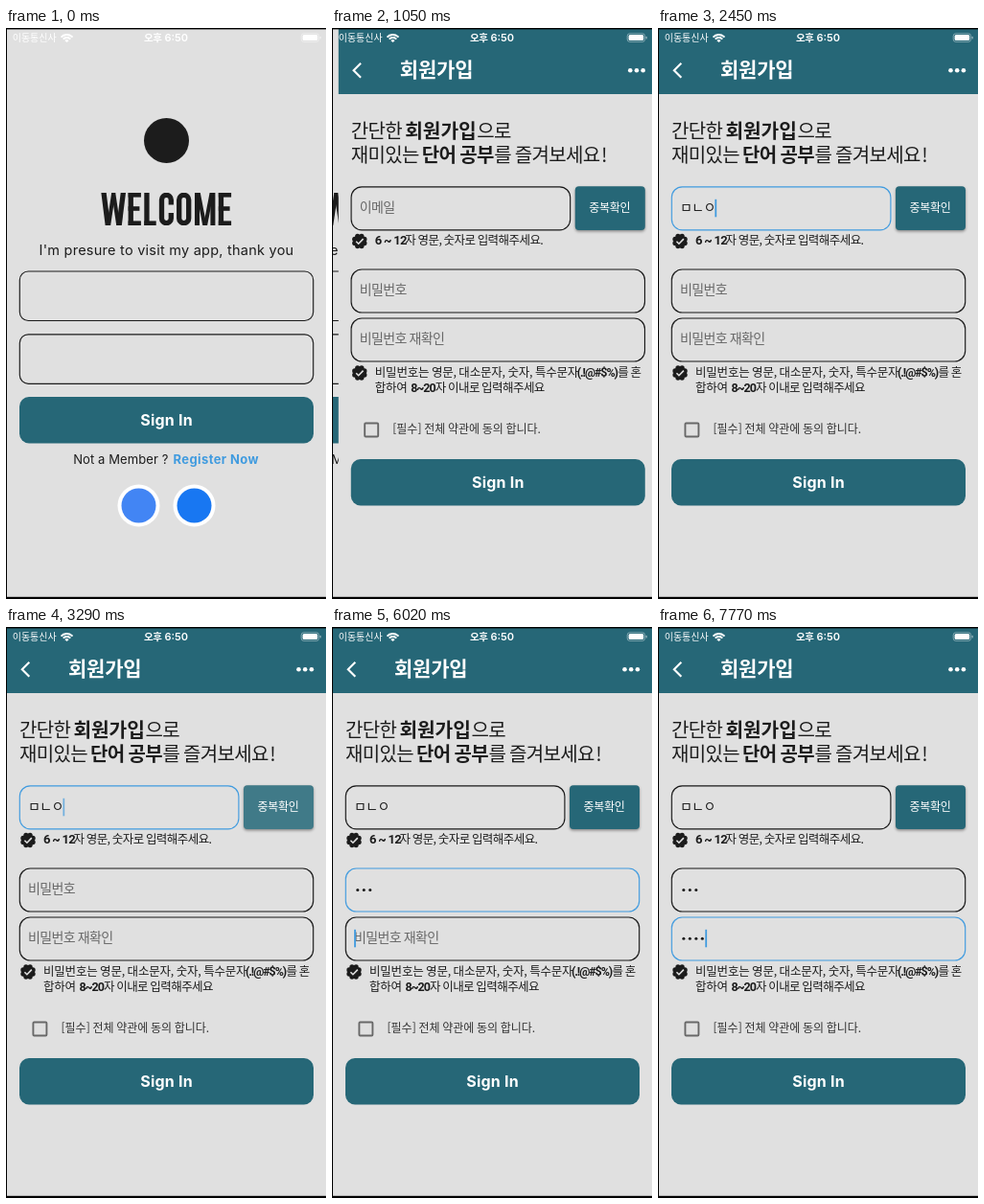
An HTML page with a canvas for the animation above (8000 ms loop, 334x596 px).

```html
<!DOCTYPE html>
<html lang="ko">
<head>
<meta charset="utf-8">
<title>Sign up</title>
<style>
html, body { margin: 0; width: 100%; height: 100%; overflow: hidden; background: #000; }
canvas { display: block; }
</style>
</head>
<body>
<canvas id="stage" width="334" height="596" role="img" aria-label="WELCOME, sign-in and sign-up screens"></canvas>
<script>
const ctx = document.getElementById('stage').getContext('2d');
const WIDTH = 334, HEIGHT = 596, LOOP = 8000, STEP = 70;
const KR = '"Noto Sans CJK KR", "Noto Sans CJK JP", "Noto Sans CJK", sans-serif';
const LATIN = 'Inter, "Open Sans", sans-serif';
const DIGITS = 'Roboto, "Liberation Sans", sans-serif';
const PAPER = '#e0e0e0', TEAL = '#266777', INK = '#1c1c1c', HINT = '#686868', BLUE = '#409bdf';

// ---- timing ----
const clamp = v => Math.max(0, Math.min(1, v));
const ramp = (t, from, to) => clamp((t - from) / (to - from));
const countPast = (t, times) => times.filter(at => t >= at).length;

function bezier(x, x1, y1, x2, y2) {
  const at = (s, a, b) => 3 * (1 - s) ** 2 * s * a + 3 * (1 - s) * s * s * b + s ** 3;
  let lo = 0, hi = 1;
  for (let i = 0; i < 24; i++) {
    const mid = (lo + hi) / 2;
    if (at(mid, x1, x2) < x) lo = mid; else hi = mid;
  }
  return at(lo, y1, y2);
}

// Fast start, then a long settle; the two curves meet at (mx, my).
function pageEase(x) {
  const mx = 0.198, my = 0.541;
  if (x <= 0 || x >= 1) return clamp(x);
  if (x < mx) return my * bezier(x / mx, 0.056 / mx, 0.024 / my, 0.108 / mx, 0.3085 / my);
  const sx = 1 - mx, sy = 1 - my;
  return my + sy * bezier((x - mx) / sx, (0.3655 - mx) / sx, 1, (0.5465 - mx) / sx, (0.989 - my) / sy);
}
const parallaxEase = x => x <= 0 || x >= 1 ? clamp(x) : bezier(x, 0.35, 0.91, 0.33, 0.97);

// ---- drawing helpers ----
function text(str, x, y, size, { color = INK, weight = 400, family = KR, spacing = 0, align = 'left' } = {}) {
  ctx.font = `${weight} ${size}px ${family}`;
  ctx.letterSpacing = spacing + 'px';
  ctx.textAlign = align;
  ctx.fillStyle = color;
  ctx.fillText(str, x, y);
}

function box(x, y, w, h, r, fill, stroke, line = 1.15) {
  ctx.beginPath();
  ctx.roundRect(x, y, w, h, r);
  if (fill) { ctx.fillStyle = fill; ctx.fill(); }
  if (stroke) { ctx.strokeStyle = stroke; ctx.lineWidth = line; ctx.stroke(); }
}

function disc(x, y, r, color) {
  ctx.fillStyle = color;
  ctx.beginPath();
  ctx.arc(x, y, r, 0, Math.PI * 2);
  ctx.fill();
}

function line(color, width, ...points) {
  ctx.strokeStyle = color;
  ctx.lineWidth = width;
  ctx.beginPath();
  points.forEach(([x, y]) => ctx.lineTo(x, y));
  ctx.stroke();
}

function at(x, draw) {
  ctx.save();
  ctx.translate(x, 0);
  draw();
  ctx.restore();
}

function signInButton(y) {
  box(14, y, 307, 48.5, 10, TEAL);
  text('Sign In', 167.6, y + 30, 16, { color: '#fff', weight: 700, family: LATIN, spacing: 0.25, align: 'center' });
}

// ---- welcome page ----
const STEM = 5.3, BAR = 4.6;

function letterE(x) {
  ctx.fillRect(x, 172, STEM, 34);
  ctx.fillRect(x, 172, 13.3, BAR);
  ctx.fillRect(x, 186.2, 11.8, BAR);
  ctx.fillRect(x, 206 - BAR, 13.3, BAR);
}

// Tall condensed display lettering
function headline() {
  ctx.save();
  ctx.beginPath();
  ctx.rect(90, 172, 155, 34);
  ctx.clip();
  ctx.fillStyle = INK;
  line(INK, STEM, [101.8, 170], [106.4, 207]);
  line(INK, 4, [107, 207], [112.2, 172]);
  line(INK, 4, [112.2, 172], [117.4, 207]);
  line(INK, STEM, [118, 207], [122.6, 170]);
  letterE(127.6);
  ctx.fillRect(144.3, 172, STEM, 34);
  ctx.fillRect(144.3, 206 - BAR, 12.4, BAR);

  const top = 174.4, bottom = 203.6, left = 162.5, right = 172.3;
  ctx.strokeStyle = INK;
  ctx.lineWidth = STEM;
  ctx.beginPath();
  ctx.moveTo(right, 184.5);
  ctx.arcTo(right, top, 167, top, 4.8);
  ctx.arcTo(left, top, left, 184, 4.8);
  ctx.arcTo(left, bottom, 167, bottom, 4.8);
  ctx.arcTo(right, bottom, right, 194, 4.8);
  ctx.lineTo(right, 193);
  ctx.stroke();
  box(180.7, top, 10, bottom - top, 4.8, null, INK, STEM);

  ctx.fillRect(197, 172, 5, 34);
  ctx.fillRect(213.4, 172, 5, 34);
  line(INK, 4, [200, 168], [207.7, 208]);
  line(INK, 4, [215.4, 168], [207.7, 208]);
  letterE(221.8);
  ctx.restore();
}

function welcomePage() {
  disc(167.5, 117.5, 23.5, INK);
  headline();
  text("I'm presure to visit my app, thank you", 167.5, 237, 14.5,
    { family: LATIN, spacing: 0.24, align: 'center' });
  box(14.3, 254, 306.4, 51.5, 9, null, INK);
  box(14.3, 319.8, 306.4, 51.5, 9, null, INK);
  signInButton(385);
  text('Not a Member ?', 70.2, 455, 13, { family: LATIN, spacing: 0.1 });
  text('Register Now', 174.5, 455, 13, { color: BLUE, weight: 700, family: LATIN, spacing: 0.4 });
  [[138.5, '#4285f4'], [196.5, '#1877f2']].forEach(([x, color]) => {
    disc(x, 498.5, 22, '#fff');
    disc(x, 498.5, 18, color);
  });
}

// ---- sign-up page ----
function badge(x, y) {
  for (let i = 0; i < 8; i++) {
    const a = (i + 0.5) * Math.PI / 4;
    disc(x + 5.5 * Math.cos(a), y + 5.5 * Math.sin(a), 2.6, INK);
  }
  disc(x, y, 6.4, INK);
  line(PAPER, 1.6, [x - 3.6, y + 0.2], [x - 1.1, y + 2.7], [x + 3.8, y - 2.4]);
}

function field(y, w, hint, focus) {
  const mix = (a, b) => Math.round(a + (b - a) * focus);
  box(14.3, y, w, 45, 11, null, `rgb(${mix(24, 64)},${mix(24, 155)},${mix(24, 223)})`);
  if (hint) text(hint, 23, y + 26, 14, { color: HINT, spacing: -0.6 });
}

function caret(x, y, alpha) {
  ctx.globalAlpha = alpha;
  ctx.fillStyle = BLUE;
  ctx.fillRect(x - 0.9, y, 1.8, 18.5);
  ctx.globalAlpha = 1;
}

const dots = (count, y) => {
  for (let i = 0; i < count; i++) disc(26.8 + i * 6.5, y, 1.55, INK);
};

const blink = (t, off, offEnd, on, onEnd) => Math.max(1 - ramp(t, off, offEnd), ramp(t, on, onEnd));

function inputs(t) {
  const toPassword = ramp(t, 3710, 3920), toConfirm = ramp(t, 6020, 6160);
  const jamo = 'ㅁㄴㅇ'.slice(0, countPast(t, [2240, 2380, 2450]));
  const secret = countPast(t, [5460, 5530, 5600]);
  const repeat = countPast(t, [6230, 6370, 6510, 6720]);

  field(165.8, 228.6, jamo ? '' : '이메일', ramp(t, 1820, 2100) * (1 - toPassword));
  text(jamo, 23, 192, 14, { spacing: -0.6 });
  field(252, 306.4, secret ? '' : '비밀번호', toPassword * (1 - toConfirm));
  dots(secret, 274.5);
  field(303, 306.4, repeat ? '' : '비밀번호 재확인', toConfirm);
  dots(repeat, 325.3);

  const after = count => count ? 24.2 + count * 6.5 : 24;
  if (t >= 6020) caret(after(repeat), 315.8, blink(t, 7280, 7420, 7630, 7770));
  else if (t >= 3780) caret(after(secret), 264.8, blink(t, 4270, 4480, 4620, 4830));
  else if (t >= 1890) caret(24 + jamo.length * 12.1, 178.8, blink(t, 2940, 3080, 3150, 3360));
}

function checkButton(t) {
  ctx.save();
  ctx.shadowColor = 'rgba(0,0,0,.4)';
  ctx.shadowBlur = 3;
  ctx.shadowOffsetY = 1.5;
  box(248, 165.3, 73, 45.7, 4, TEAL);
  ctx.restore();
  const press = ramp(t, 2940, 3080) * (1 - ramp(t, 3150, 3500));
  if (press) box(248, 165.3, 73, 45.7, 4, `rgba(255,255,255,${0.2 * press})`);
  text('중복확인', 262.5, 192.3, 12, { color: '#fff', spacing: -0.3 });
}

function signUpPage(t) {
  ctx.fillStyle = PAPER;
  ctx.fillRect(1, 0, WIDTH, HEIGHT);
  ctx.fillStyle = TEAL;
  ctx.fillRect(1, 0, WIDTH, 69);
  line('#fff', 2.1, [24.3, 36.8], [16.8, 44.2], [24.3, 51.7]);
  text('회원가입', 65, 51, 21, { color: '#fff', weight: 700, spacing: -0.2 });
  [305.5, 312.2, 318.9].forEach(x => disc(x, 44.2, 2.3, '#fff'));

  const big = { spacing: -0.65 }, bigBold = { weight: 700, spacing: -0.1 };
  text('간단한', 14, 114.5, 20, big);
  text('회원가입', 70.5, 114.5, 20.3, bigBold);
  text('으로', 145.5, 114.5, 20, big);
  text('재미있는', 14, 139.5, 20, big);
  text('단어 공부', 88, 139.5, 20, { weight: 700, spacing: -0.6 });
  text('를 즐겨보세요', 163.5, 139.5, 20, big);
  text('!', 275.3, 139.5, 20, { weight: 500 });

  const narrow = { weight: 700, family: DIGITS, spacing: -1.1 };
  badge(23, 222.5);
  text('6 ~ 12', 39, 226.2, 13, { ...narrow, spacing: -0.7 });
  text('자 영문, 숫자로 입력해주세요.', 70.5, 226, 12.5, { spacing: -0.55 });
  badge(23, 360);
  text('비밀번호는 영문, 대소문자, 숫자, 특수문자', 39, 363.7, 12.5, { spacing: -0.2 });
  text('(.!@#$%)', 250, 363.5, 12.5, narrow);
  text('를 혼', 292.5, 363.7, 12.5, { spacing: -0.5 });
  text('합하여', 39, 379.7, 12.5, { spacing: -0.3 });
  text('8~20', 76.5, 379.7, 12.5, narrow);
  text('자 이내로 입력해주세요', 102, 379.7, 12.5, { spacing: -0.55 });

  inputs(t);
  checkButton(t);
  box(28.4, 412.5, 14, 14, 1, null, HINT, 1.9);
  text('[필수] 전체 약관에 동의 합니다.', 57.5, 423.2, 12, { color: '#333' });
  signInButton(450);
}

// ---- shell ----
function statusBar() {
  const white = '#fff';
  text('이동통신사', 6.7, 14, 10, { color: white });
  text('오후', 144, 14.2, 10.5, { color: white, weight: 700, spacing: -0.3 });
  text('6:50', 165.5, 14.2, 11, { color: white, weight: 600, family: LATIN });
  ctx.strokeStyle = white;
  ctx.lineWidth = 1.8;
  [8, 5].forEach(r => {
    ctx.beginPath();
    ctx.arc(63.5, 15, r, -Math.PI * 0.77, -Math.PI * 0.23);
    ctx.stroke();
  });
  ctx.fillStyle = white;
  ctx.beginPath();
  ctx.moveTo(63.5, 15);
  ctx.arc(63.5, 15, 2.8, -Math.PI * 0.77, -Math.PI * 0.23);
  ctx.fill();
  box(308.2, 5.8, 18.4, 8.6, 2.6, null, 'rgba(255,255,255,.45)', 0.9);
  box(309.6, 7.1, 15.6, 6, 1.5, white);
  box(327.6, 8.7, 1.2, 2.8, 0.6, 'rgba(255,255,255,.5)');
}

function bezel() {
  ctx.fillStyle = '#000';
  ctx.fillRect(0, 0, 1, HEIGHT);
  ctx.fillRect(0, 0, WIDTH, 1.4);
  ctx.fillRect(0, 593.8, WIDTH, 3);
}

function draw(now) {
  const t = Math.floor((now % LOOP) / STEP) * STEP;
  const push = ramp(t, 838.3, 1160);
  ctx.fillStyle = PAPER;
  ctx.fillRect(0, 0, WIDTH, HEIGHT);
  if (push < 1) at(-WIDTH / 3 * parallaxEase(push), welcomePage);
  if (push > 0) at(WIDTH * (1 - pageEase(push)), () => signUpPage(t));
  statusBar();
  bezel();
}

const start = performance.now();
function tick() {
  draw(performance.now() - start);
  requestAnimationFrame(tick);
}
tick();
</script>
</body>
</html>
```
